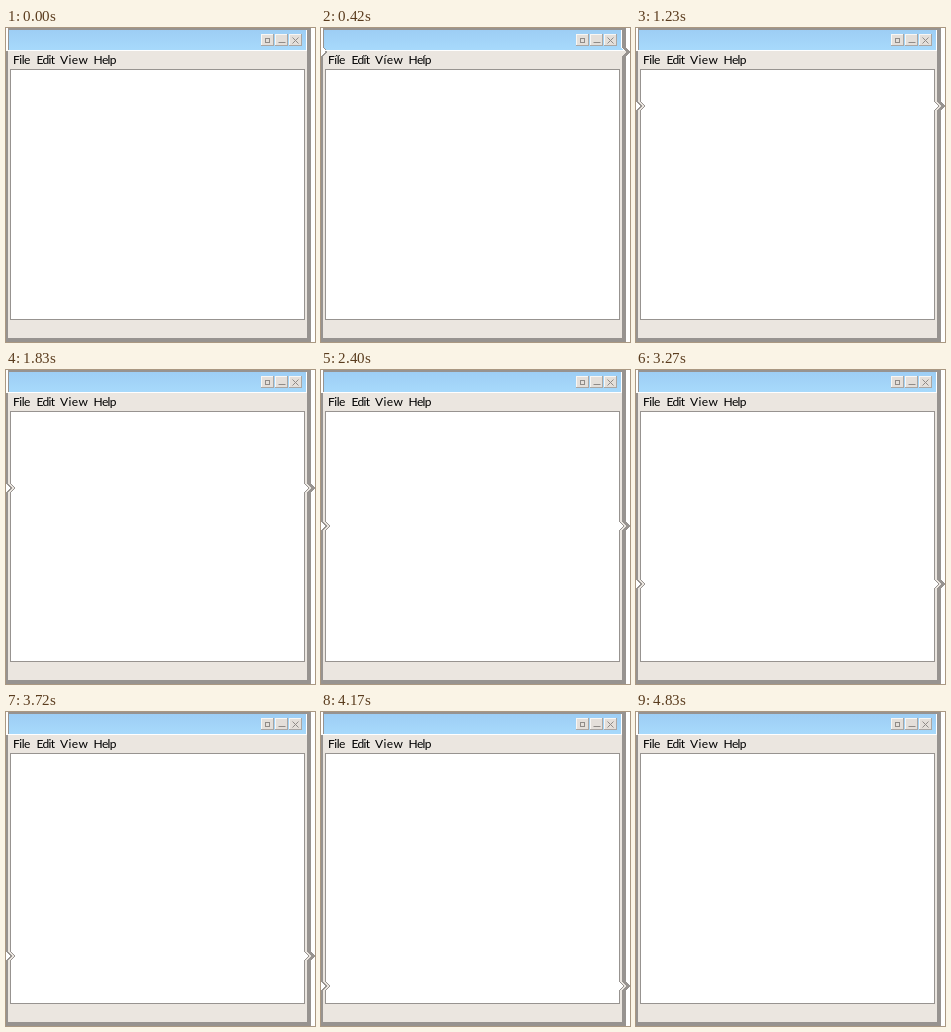
These frames come from a looping animation (309 by 314 pixels, 4860 ms). An HTML page with a canvas:

```html
<!DOCTYPE html>
<html lang="en">
<head>
<meta charset="utf-8">
<title>Rippling window</title>
<style>
  html, body { margin: 0; width: 100%; height: 100%; overflow: hidden; background: #fff; }
  canvas { display: block; }
</style>
</head>
<body>
<canvas id="stage" width="309" height="314"></canvas>
<script>
const W = 309, H = 314;
const STEP = 30, LOOP = 4860;
const BAND = 8, SPEED = 2, PUSH = 4;
const GRAY = '#979390', BEIGE = '#ebe6e0';

const ctx = document.getElementById('stage').getContext('2d');
const win = document.createElement('canvas');
win.width = W;
win.height = H;
const g = win.getContext('2d');

function box(color, x, y, w, h) {
  g.fillStyle = color;
  g.fillRect(x, y, w, h);
}

function line(color, ...points) {
  g.strokeStyle = color;
  g.beginPath();
  points.forEach(([x, y]) => g.lineTo(x + 0.5, y + 0.5));
  g.stroke();
}

function button(x) {
  box('#aaa6a3', x, 6, 13, 12);
  box('#f8f6f3', x, 6, 12, 11);
  box('#e4dfda', x + 1, 7, 11, 10);
}

function label(text, x, spacing) {
  g.letterSpacing = spacing + 'px';
  g.fillText(text, x, 36);
}

function drawWindow() {
  box('#fff', 0, 0, W, H);

  // frame
  box(GRAY, 0, 23, 305, 291);
  box(GRAY, 2, 0, 303, 23);
  box(BEIGE, 2, 23, 299, 287);

  // title bar
  const sky = g.createLinearGradient(0, 1, 0, 21);
  sky.addColorStop(0, '#9dcdf4');
  sky.addColorStop(1, '#a7d9fb');
  box(sky, 3, 2, 297, 20);
  box('#fff', 300, 2, 1, 20);
  box('#fff', 0, 22, 301, 1);

  [255, 269, 283].forEach(button);
  g.strokeStyle = '#8f8b88';
  g.strokeRect(259.5, 10.5, 4, 4);
  line('#8f8b88', [272, 14], [279, 14]);
  line('#8f8b88', [286, 9], [292, 15]);
  line('#8f8b88', [292, 9], [286, 15]);

  // menu
  g.fillStyle = '#000';
  g.font = '12px Lato, sans-serif';
  label('File', 7, -0.5);
  label('Edit', 30.5, -0.7);
  label('View', 54, 0.4);
  label('Help', 87.5, -0.6);

  // content
  box(GRAY, 4, 41, 295, 251);
  box('#fff', 5, 42, 293, 249);
}

// A short band of rows bulges to the right as it sweeps down.
function render(now) {
  const step = Math.floor((now % LOOP) / STEP);
  const top = step * SPEED - BAND;
  ctx.drawImage(win, 0, 0);
  for (let i = 0; i < BAND; i++) {
    const y = top + i;
    if (y < 0 || y >= H) continue;
    const shift = Math.round(PUSH * Math.sin(Math.PI * (i + 0.5) / BAND));
    ctx.fillStyle = '#fff';
    ctx.fillRect(0, y, W, 1);
    ctx.drawImage(win, 0, y, W - shift, 1, shift, y, W - shift, 1);
  }
}

drawWindow();
const start = performance.now();
function tick() {
  render(performance.now() - start);
  requestAnimationFrame(tick);
}
tick();
</script>
</body>
</html>
```
